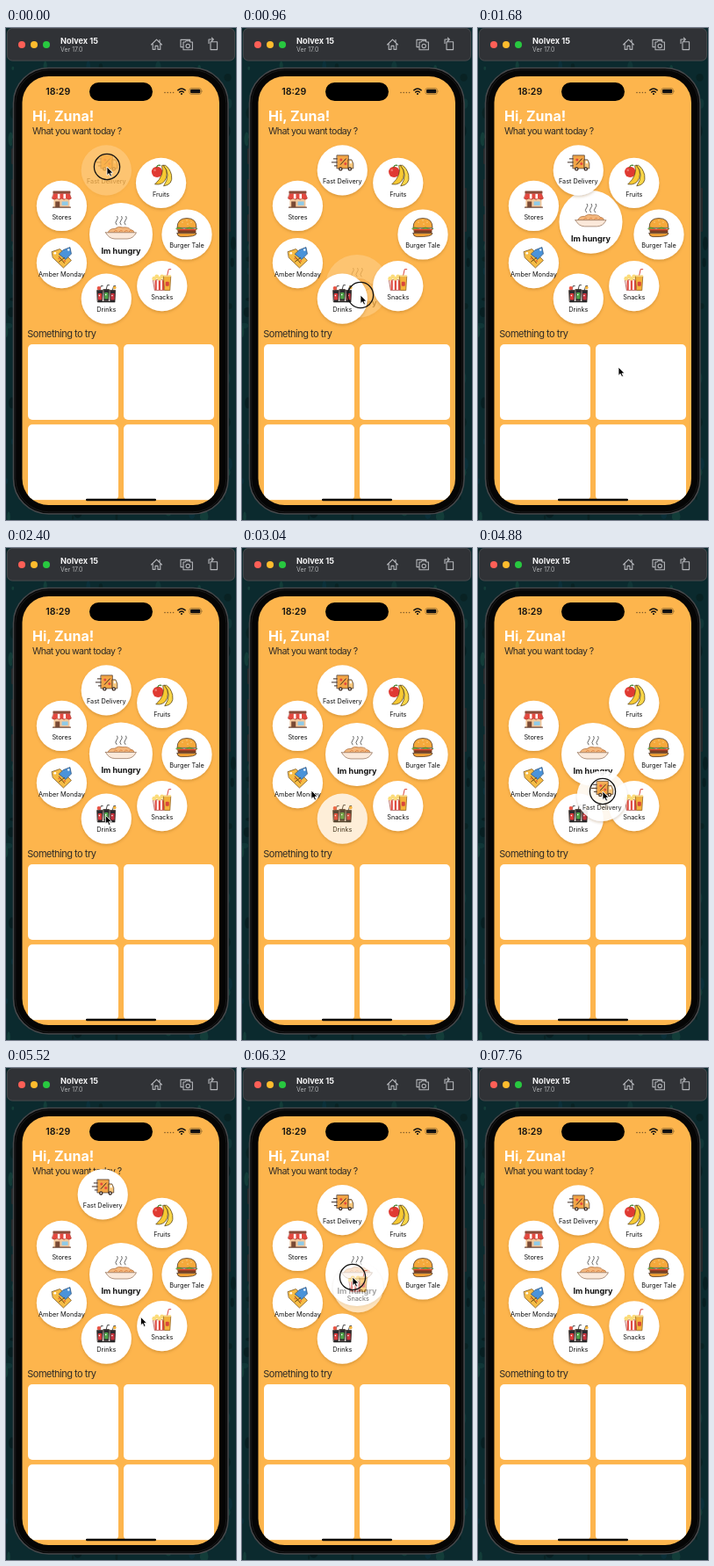
Recreate the animation shown at these times as an HTML page. Size 262 px wide and 560 px high, loop 7.84 s.

```html
<!DOCTYPE html>
<html lang="en">
<head>
<meta charset="utf-8">
<title>Food bubbles</title>
<style>
html, body { margin: 0; width: 100%; height: 100%; overflow: hidden; background: #0b2a2e; }
svg { display: block; width: 262px; height: 560px; font-family: Inter, Roboto, sans-serif; }
.label { font-size: 7.3px; text-anchor: middle; fill: #111; }
.big { font-size: 9.1px; font-weight: 700; }
.line { fill: none; stroke-linecap: round; stroke-linejoin: round; }
</style>
</head>
<body>
<svg id="stage" viewBox="0 0 262 560">
  <defs>
    <filter id="shadow" x="-20%" y="-20%" width="140%" height="150%">
      <feDropShadow dx="0" dy="1.8" stdDeviation="1.8" flood-color="#7a4300" flood-opacity=".26"/>
    </filter>
    <clipPath id="screen"><rect x="18.5" y="55" width="224.5" height="488" rx="30"/></clipPath>
    <clipPath id="list"><rect x="18" y="355" width="226" height="182.5"/></clipPath>
  </defs>

  <rect width="262" height="560" fill="#0b2a2e"/>
  <g id="leaves"></g>

  <rect x="1" y="0" width="260" height="37.5" rx="6" fill="#303236"/>
  <rect x="1.4" y=".4" width="259.2" height="36.7" rx="6" fill="none" stroke="#55585c" stroke-width=".6"/>
  <circle cx="18" cy="19" r="4" fill="#fe5f57"/>
  <circle cx="32" cy="19" r="4" fill="#febc2e"/>
  <circle cx="46" cy="19" r="4" fill="#28c840"/>
  <text x="62" y="18" font-size="9.2" font-weight="700" fill="#f4f4f5">Nolvex 15</text>
  <text x="62" y="27.3" font-size="7" fill="#b5b7ba">Ver 17.0</text>
  <g class="line" stroke="#b4b6ba" stroke-width="1.1">
    <path d="M165.5 19 171.5 13.2 177.5 19M167.2 18V24.4H170V20.4H173V24.4H175.8V18M175 13.5V16"/>
    <path d="M201 21.6H199V13.4H209.6V15M202 16H204L205 14.8H209L210 16H212.4V24.8H202Z"/>
    <circle cx="207.2" cy="20.4" r="2.2"/>
    <path d="M233 15.8H240.6V24.6H233ZM231 17.4V13H236M234.4 11.2 236.3 13 234.4 14.8"/>
  </g>

  <g fill="#25282a">
    <rect x="6" y="137" width="4" height="18" rx="1"/>
    <rect x="6" y="172" width="4" height="31" rx="1"/>
    <rect x="6" y="212" width="4" height="31" rx="1"/>
    <rect x="252" y="182" width="4" height="50" rx="1"/>
  </g>
  <rect x="8.5" y="45.5" width="244.5" height="507.5" rx="40" fill="#050505" stroke="#45474a" stroke-width="1.6"/>
  <rect x="10.8" y="47.8" width="240" height="503" rx="38" fill="none" stroke="#191a1b" stroke-width="1"/>

  <g clip-path="url(#screen)">
    <rect x="18" y="54" width="226" height="490" fill="#fdb54d"/>
    <g clip-path="url(#list)" id="cards" fill="#fff"></g>
  </g>
  <rect x="95" y="62" width="72" height="21" rx="10.5" fill="#000"/>
  <text x="59.2" y="76" font-size="10.6" font-weight="600" text-anchor="middle" fill="#111">18:29</text>
  <g fill="#7d5a28">
    <circle cx="181" cy="73.5" r=".8"/><circle cx="184.2" cy="73.5" r=".8"/>
    <circle cx="187.4" cy="73.5" r=".8"/><circle cx="190.6" cy="73.5" r=".8"/>
  </g>
  <g class="line" stroke="#111" stroke-width="1.5">
    <path d="M195.8 70.8Q200 67.4 204.2 70.8M197.7 73Q200 71.2 202.3 73"/>
  </g>
  <circle cx="200" cy="75" r="1.1" fill="#111"/>
  <rect x="209" y="68.6" width="13.4" height="6.8" rx="2" fill="none" stroke="#8d672f" stroke-width=".7"/>
  <rect x="210.1" y="69.7" width="11.2" height="4.6" rx="1.2" fill="#111"/>
  <path d="M223.2 70.8Q224.6 72 223.2 73.2Z" fill="#8d672f"/>

  <text x="30" y="105.8" font-size="16" font-weight="700" fill="#fff">Hi, Zuna!</text>
  <text x="30" y="121.3" font-size="10.6" letter-spacing="-.6" fill="#2d2a26">What you want today ?</text>
  <text x="24.3" y="351.6" font-size="11" letter-spacing="-.5" fill="#2d2a26">Something to try</text>

  <g id="bubbles"></g>
  <rect x="91" y="535.7" width="80" height="2.6" rx="1.3" fill="#000"/>

  <circle id="ring" r="14.6" fill="none" stroke="#111" stroke-width="1.3"/>
  <path id="cursor" d="M0 0V9.6L2.2 7.6 3.8 11.1 5.5 10.3 4 7H7Z" fill="#000" stroke="#fff" stroke-width=".8" stroke-linejoin="round"/>
</svg>

<script>
const LOOP = 7840;
const HUB = { x: 131, y: 235 };
const $ = id => document.getElementById(id);

const rect = (x, y, w, h, fill, r = 0) => `<rect x="${x}" y="${y}" width="${w}" height="${h}" rx="${r}" fill="${fill}"/>`;
const dot = (x, y, r, fill) => `<circle cx="${x}" cy="${y}" r="${r}" fill="${fill}"/>`;
const shape = (d, fill, stroke = '#3b2a22', w = .7) =>
  `<path d="${d}" fill="${fill}" stroke="${stroke}" stroke-width="${w}" stroke-linejoin="round" stroke-linecap="round"/>`;

function can(x, y, fill) {
  return shape(`M${x} ${y}h6.4l-.7 13h-5Z`, '#2b2b30') + rect(x + 1.1, y + 3.5, 4.2, 7.5, fill, .8) +
    shape(`M${x + 3} ${y}L${x + 4.4} ${y - 5}h2`, 'none', '#333', .9) + dot(x + 2.6, y + 6, .8, '#fff');
}

// Icons are drawn around each bubble's centre.
const icons = {
  burger:
    shape('M-11-8Q-11-18.5 0-18.5T11-8Z', '#f5a93b') +
    shape('M-12-7Q-9-9-6-7T0-7 6-7 12-7L10-4.6H-10Z', '#6cb33f', '#3f7e2b') +
    rect(-10.5, -5, 21, 3.2, '#7b3f22', 1.5) + rect(-11, -6.2, 22, 1.5, '#e8452f', .7) +
    shape('M-11-1.4H11Q11 3-7 2.6Q-11 2.4-11-1.4Z', '#f0a035') +
    [[-5, -14], [0, -16], [5, -14], [1, -12]].map(p => dot(...p, .6, '#fff0c4')).join(''),
  snacks:
    shape('M-10-7H4L2 5H-8Z', '#fff', '#a33b33') +
    [-8.2, -4, .2].map(x => rect(x, -6.5, 2.2, 11, '#df4a40')).join('') +
    [-9, -6, -3, 0, 3].map((x, i) => dot(x, -8.5 - i % 2 * 2.2, 2.4, '#fbdc7b')).join('') +
    shape('M2-11H10L9 5H3Z', '#f3b23c', '#8a5a1c') + rect(1.6, -12.5, 8.8, 2.2, '#f7d783', 1) +
    rect(4, -5, 4, 5, '#d9463c', 1) + shape('M6-12.5L7.5-19H10', 'none', '#d9463c', 1),
  drinks: can(-10.5, -9.5, '#d93a3a') + can(4, -9.5, '#c8323c') + can(-3.2, -10.5, '#4fa548') +
    dot(-8.5, -12, 2.2, '#e85545') + dot(9.5, -12.5, 1.8, '#f3b23c') + rect(-10, 3, 20, 1.2, '#222', .5),
  tags:
    shape('M-11-13L-2-16 11-3 2 5.5-10-6Z', '#f6bc45', '#6d4a16') +
    shape('M2-15L9.5-18 11-10.5 4.5-4-3-10Z', '#4a93d9', '#274a72') +
    dot(7.8, -15, 1.2, '#fff') + dot(-7.6, -11.2, 1.3, '#fff') +
    shape('M-3-7.5L3 0M-3-1.5L3-6', 'none', '#6d4a16', 1) + dot(-2.8, -5.2, 1.2, '#e8762f') + dot(3.4, -2.4, 1.2, '#e8762f'),
  store:
    rect(-9, -10, 18, 11.5, '#f2c79c') + rect(-10, -17, 20, 3, '#8a4a38', .5) +
    shape('M-9-14H9L11-8.5Q8.5-6 5.5-8.5Q2.7-6 0-8.5Q-2.7-6-5.5-8.5Q-8.5-6-11-8.5Z', '#e5483f', '#9c3029', .5) +
    rect(-4.6, -13.6, 2.6, 5.5, '#fff') + rect(2, -13.6, 2.6, 5.5, '#fff') +
    rect(-7.2, -5, 5, 6.5, '#7a4a35') + rect(.2, -5, 7, 4.4, '#8fcbe8') + rect(-10.5, 1, 21, 1.4, '#6b4435', .5),
  delivery:
    shape('M-6-17H7V-2H-6Z', '#f2a546') + shape('M7-12H10.5L12.5-7.5V-2H7Z', '#f8c77b') +
    rect(8.4, -10.7, 2.2, 3, '#fff') + dot(-2, -1.5, 2.2, '#3b2a22') + dot(8.5, -1.5, 2.2, '#3b2a22') +
    dot(-2, -1.5, .9, '#fff') + dot(8.5, -1.5, .9, '#fff') +
    shape('M-2-6.5L4-13M-10-13H-6M-12-9H-6M-9-5H-6', 'none', '#3b2a22', 1) +
    dot(-1.5, -12, 1.5, '#e5483f') + dot(3.5, -7.5, 1.5, '#e5483f'),
  fruits:
    dot(-4.5, -12.5, 6.2, '#e03a32') + shape('M-5-18Q-4-21-1-20', 'none', '#3f7e2b', 1.3) +
    shape('M1-19.5Q4.5-9-7 1.5Q3 3 6-6Q8-14 3.4-20Z', '#f7c933', '#4a3612') +
    shape('M3-19.5Q12-10 3 3.5Q14 2 12-9Q10-17 5-20Z', '#f9d648', '#4a3612') +
    dot(-7, -14.5, 1.3, '#ef766c'),
  bowl:
    [-5, 0, 5].map(x => shape(`M${x} -11q-2.4-2.6 0-5t.8-4.6`, 'none', '#555', .9)).join('') +
    shape('M-15-2Q-13-7-7-6.5Q-3-10 2-8Q8-9 11-5.5Q15-5 15-2Z', '#f3b77d', '#a86b3c') +
    [-8, -2, 4, 9].map(x => shape(`M${x}-3.2q1.5-2.4 3.4-1`, 'none', '#d97b3c', .8)).join('') +
    shape('M-17.5-2.2H17.5Q14 4.8 7 5H-7Q-14 4.8-17.5-2.2Z', '#fbe9da', '#8f6a52')
};

// Seven bubbles on a circle, clockwise from the right; the hub lies below them.
const ringItems = [
  ['Burger Tale', 'burger'], ['Snacks', 'snacks'], ['Drinks', 'drinks'], ['Amber Monday', 'tags'],
  ['Stores', 'store'], ['Fast Delivery', 'delivery'], ['Fruits', 'fruits']
];
const items = [{ key: 'bowl', name: 'Im hungry', x: HUB.x, y: HUB.y, r: 36 }];
ringItems.forEach(([name, key], i) => {
  const a = i * 2 * Math.PI / 7;
  items.push({ key, name, x: HUB.x + 75 * Math.cos(a), y: HUB.y + 75 * Math.sin(a), r: 28.6 });
});

$('bubbles').innerHTML = items.map(b => {
  const hub = b.key === 'bowl';
  return `<g id="${b.key}"><circle r="${b.r}" fill="#fff" filter="url(#shadow)"/>${icons[b.key]}` +
    `<text class="label${hub ? ' big' : ''}" y="${hub ? 21.8 : 15.2}">${b.name}</text></g>`;
}).join('');

$('cards').innerHTML = [360, 451.3].map(y =>
  rect(25, y, 103, 86, '#fff', 5) + rect(134, y, 103, 86, '#fff', 5)).join('');

let seed = 7;
const rnd = () => (seed = seed * 16807 % 2147483647) / 2147483647;
const greens = ['#123c3c', '#08201f', '#17463f', '#0c3340', '#061a1d'];
$('leaves').innerHTML = Array.from({ length: 260 }, () =>
  `<ellipse cx="${rnd() * 262}" cy="${rnd() * 560}" rx="${1 + rnd() * 4}" ry="${2 + rnd() * 6}" fill="${greens[rnd() * 5 | 0]}" opacity=".7"/>`).join('');

// Pointer path: time, x, y
const path = [
  [0, 115, 158], [160, 115, 158], [600, 135, 245], [740, 135, 245], [960, 135, 304], [1110, 160, 386],
  [1700, 160, 386], [2480, 112, 302], [2860, 112, 302], [3040, 79, 276], [3200, 62, 264], [3460, 62, 264],
  [3780, 62, 198], [4040, 62, 198], [4380, 115, 156.5], [4540, 115, 156.5], [4880, 142, 277], [5100, 144, 284],
  [5300, 144, 284], [5860, 171.5, 282], [6040, 171.5, 282], [6320, 126, 238], [6560, 118, 230],
  [6900, 118, 230], [7500, 285, 420]
];

// fade: when the pressed look starts to clear
const touches = [
  { key: 'delivery', down: -200, fade: 130, up: 130 },
  { key: 'bowl', down: 680, fade: 980, up: 1210 },
  { key: 'drinks', down: 2620, fade: 2860, up: 2860 },
  { key: 'tags', down: 3280, fade: 3430, up: 3430 },
  { key: 'store', down: 3850, fade: 4000, up: 4000 },
  { key: 'delivery', down: 4440, fade: 4660, up: 5100 },
  { key: 'snacks', down: 5940, fade: 6190, up: 6560 }
];

const clamp = v => Math.max(0, Math.min(1, v));

function pointer(t) {
  let i = path.findIndex(p => p[0] > t);
  if (i === 0) i = 1;
  if (i < 0) return path[path.length - 1].slice(1);
  const [t0, x0, y0] = path[i - 1], [t1, x1, y1] = path[i];
  const u = clamp((t - t0) / (t1 - t0)), k = u * u * (3 - 2 * u);
  return [x0 + (x1 - x0) * k, y0 + (y1 - y0) * k];
}

// Damped spring from 1 to 0 (stiffness 100, damping 10)
function spring(ms) {
  const s = ms / 1000, w = 8.66 * s;
  return Math.exp(-5 * s) * (Math.cos(w) + .577 * Math.sin(w));
}

function pose(key, t) {
  const p = { dx: 0, dy: 0, alpha: 1 };
  if (key === 'fruits') p.dx = -1.2 * spring(t);
  for (const h of touches) {
    if (h.key !== key || t < h.down) continue;
    const from = pointer(h.down), to = pointer(Math.min(t, h.up));
    const k = t > h.up ? spring(t - h.up) : 1;
    p.dx += (to[0] - from[0]) * k;
    p.dy += (to[1] - from[1]) * k;
    p.alpha = 1 - .8 * clamp((t - h.down) / 90) * (1 - clamp((t - h.fade) / 250));
  }
  return p;
}

function draw(t) {
  for (const b of items) {
    const p = pose(b.key, t), el = $(b.key);
    el.setAttribute('transform', `translate(${(b.x + p.dx).toFixed(2)} ${(b.y + p.dy).toFixed(2)})`);
    el.setAttribute('opacity', p.alpha.toFixed(3));
  }
  const at = `translate(${pointer(t).join(' ')})`;
  $('cursor').setAttribute('transform', at);
  $('ring').setAttribute('transform', at);
  const pressed = touches.some(h => t >= h.down && t <= h.up);
  $('ring').setAttribute('visibility', pressed ? 'visible' : 'hidden');
}

const start = performance.now();
function tick() {
  draw((performance.now() - start) % LOOP);
  requestAnimationFrame(tick);
}
draw(0);
requestAnimationFrame(tick);
</script>
</body>
</html>
```
